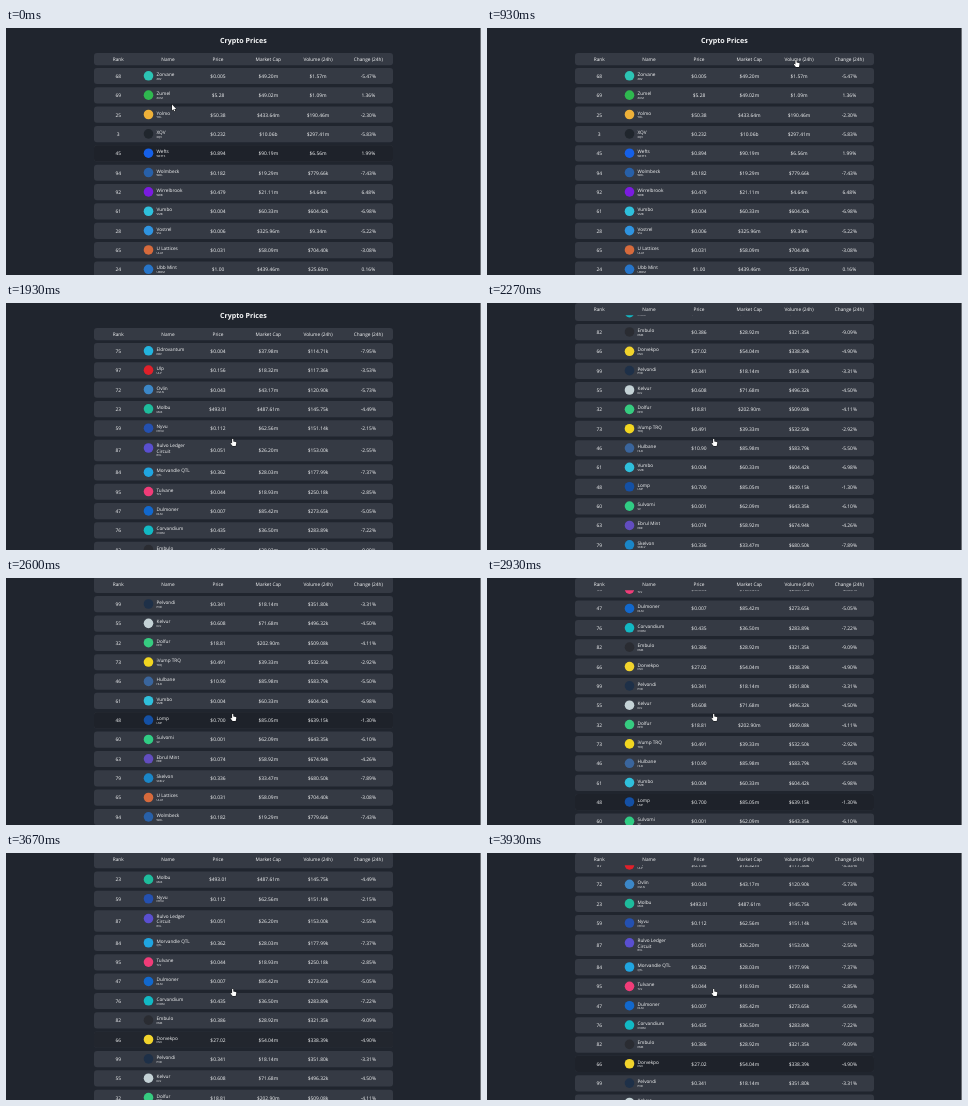
An HTML page with a canvas that plays this animation: 475 by 247 pixels, repeating every 3.99 s.

```html
<!DOCTYPE html>
<html lang="en">
<head>
<meta charset="utf-8">
<title>Crypto Prices</title>
<style>
html, body { margin: 0; width: 100%; height: 100%; overflow: hidden; background: #20252e; }
canvas { display: block; }
</style>
</head>
<body>
<canvas id="stage" width="475" height="247"></canvas>
<script>
const ctx = document.getElementById('stage').getContext('2d');
const LOOP = 3990, STEP = 200 / 3, SORT_AT = 1070;
const PITCH = 19.35, EXTRA = 5.3, TOP = 48;
const ROW = '#353a44', BG = '#20252e', HOVER = '#1e222a', EDGE = '#6c7076';
const FONT = '"Open Sans", "Noto Sans", sans-serif';
const COLUMNS = [112.2, 162, 212, 262.3, 312, 362.3];
const HEADS = ['Rank', 'Name', 'Price', 'Market Cap', 'Volume (24h)', 'Change (24h)'];

// rank | name | ticker | price | cap | volume | change | colour
const coins = `68|Zorvane|ZRV|0.005|49.20m|1.57m|-5.47|#2cc4b4
69|Zumel|ZUM|5.28|49.02m|1.09m|1.36|#2fb84f
25|Yolmo|YOL|50.38|433.64m|190.46m|-2.30|#eeb139
3|XQV|XQV|0.232|10.06b|297.41m|-5.83|#20262d
45|Wefts|WEFTS|0.894|90.19m|6.56m|1.99|#1560e8
94|Wolmbeck|WOL|0.182|19.29m|779.66k|-7.43|#2860a8
92|Wirrelbrook|WRB|0.479|21.11m|4.64m|6.48|#7a1be0
61|Vumbo|VMB|0.004|60.33m|604.42k|-6.98|#2fc0dc
28|Vostrel|VSL|0.006|325.96m|9.34m|-5.22|#2f94e0
65|U Lattices|ULAT|0.031|58.09m|704.40k|-3.08|#d66a3c
24|Ubb Mint|UBBM|1.00|439.46m|25.60m|0.16|#2775c9
75|Eldrovantum|EDV|0.004|37.98m|114.71k|-7.95|#23b4de
97|Ulp|ULP|0.156|18.32m|117.36k|-3.53|#e0202a
72|Ovlin|OVLN|0.043|43.17m|120.90k|-5.73|#3c87c7
23|Molbu|MLB|493.01|487.61m|145.75k|-4.49|#1ebc9c
59|Nyvu|NYVU|0.112|62.56m|151.14k|-2.15|#2450b0
87|Rulvo Ledger/Circuit|RVL|0.051|26.20m|153.00k|-2.55|#5a4fd0
84|Morvandle QTL|QTL|0.362|28.03m|177.99k|-7.37|#20a5e0
95|Tulvane|TLV|0.044|18.93m|250.18k|-2.85|#f03c78
47|Dulmoner|DLM|0.007|85.42m|273.65k|-5.05|#1268cc
76|Corvandium|CVDM|0.435|36.50m|283.89k|-7.22|#12b9c4
82|Embulo|EMB|0.386|28.92m|321.35k|-9.09|#2a2c32
66|Dorvekpo|DVK|27.02|54.04m|338.39k|-4.90|#f2d42c
99|Pelvondi|PVD|0.341|18.14m|351.80k|-3.31|#1e3048
55|Kelvur|KLV|0.608|71.68m|496.32k|-4.50|#c4d2d6
32|Dolfur|DFR|18.81|202.90m|509.08k|-4.11|#36cc80
73|iVump TRQ|TRQ|0.491|39.33m|532.50k|-2.92|#f2d620
46|Hulbane|HLB|10.90|85.98m|583.79k|-5.50|#3a659c
48|Lomp|LMP|0.700|85.05m|639.15k|-1.30|#1450a4
60|Sulvomi|SV|0.001|62.09m|643.35k|-6.10|#30cc84
63|Ebrul Mint|EBR|0.074|58.92m|674.94k|-4.26|#624dbf
79|Skelvon|SKELV|0.336|33.47m|680.50k|-7.89|#1a86c8`.split('\n').map(line => {
  const [rank, name, ticker, price, cap, volume, change, color] = line.split('|');
  return { rank, lines: name.split('/'), ticker, price, cap, volume, change, color };
});

const amount = s => parseFloat(s) * { k: 1e3, m: 1e6, b: 1e9 }[s.slice(-1)];
const byVolume = [...coins].sort((a, b) => amount(a.volume) - amount(b.volume));

// keys: [time, value...], with linear interpolation
function along(keys, t) {
  let i = 0;
  while (i < keys.length - 2 && t > keys[i + 1][0]) i++;
  const [a, b] = [keys[i], keys[i + 1]];
  const p = Math.min(1, Math.max(0, (t - a[0]) / (b[0] - a[0])));
  return a.slice(1).map((v, k) => v + (b[k + 1] - v) * p);
}

const SCROLL = [[1950, 0], [2060, 65], [2266, 217.5], [2420, 255], [2550, 262], [2680, 255],
  [2933, 177.5], [3160, 127], [3400, 98.9], [3700, 77], [3933, 55.2]];
const POINTER = [[0, 166, 76.5], [250, 205, 66], [550, 288, 40], [750, 307, 31.5],
  [1600, 307, 31.5], [1730, 266, 85], [1870, 224.7, 135.5]];
const HOVERS = [
  ['WEFTS', [[200, 1], [450, 0]]],
  ['LMP', [[2500, 0], [2600, 1], [2990, 1], [3150, 0]]],
  ['DVK', [[3500, 0], [3700, 1]]]
];

function box(y, h, color, alpha = 1) {
  ctx.globalAlpha = alpha;
  ctx.fillStyle = color;
  ctx.beginPath();
  ctx.roundRect(88, y, 299, h, 3);
  ctx.fill();
  ctx.globalAlpha = 1;
}

function text(s, x, y, size = 4.9, align = 'center', weight = 500) {
  ctx.font = `${weight} ${size}px ${FONT}`;
  ctx.textAlign = align;
  ctx.fillStyle = '#f8f9fa';
  ctx.fillText(s, x, y);
}

function drawRow(coin, y, t) {
  const tall = coin.lines.length > 1;
  const h = tall ? 16.2 + EXTRA : 16.2;
  box(y - h / 2, h, ROW);
  const hover = HOVERS.find(([ticker]) => ticker === coin.ticker);
  if (hover) box(y - h / 2, h, HOVER, along(hover[1], t)[0]);

  ctx.fillStyle = coin.color;
  ctx.beginPath();
  ctx.arc(142.5, tall ? y - 2.4 : y - 0.2, 4.8, 0, 7);
  ctx.fill();

  const first = tall ? y - 3.2 : y - 0.2;
  coin.lines.forEach((s, i) => text(s, 150.5, first + i * 5.6, 4.7, 'left'));
  text(coin.ticker, 150.5, tall ? y + 6 : y + 3.5, 2.8, 'left');

  const cells = [coin.rank, '', '$' + coin.price, '$' + coin.cap, '$' + coin.volume, coin.change + '%'];
  cells.forEach((s, i) => text(s, COLUMNS[i], y + 1.8));
}

const arrow = new Path2D('M0 0V6L1.4 4.8L2.3 6.8L3.2 6.4L2.3 4.5H4.2Z');
const hand = new Path2D('M1.4 .7Q2 -.1 2.6 .7V3L5 3.5Q5.7 3.7 5.6 4.6L5 7.6H1.9L-.1 5Q0 4.2 .6 4.4L1.4 5Z');

function drawPointer(t) {
  ctx.save();
  ctx.translate(...along(POINTER, t));
  const shape = t < STEP ? arrow : hand;
  ctx.lineWidth = 0.8;
  ctx.strokeStyle = '#111';
  ctx.stroke(shape);
  ctx.fillStyle = '#fff';
  ctx.fill(shape);
  ctx.restore();
}

function draw(t) {
  const scroll = along(SCROLL, t)[0];
  ctx.fillStyle = BG;
  ctx.fillRect(0, 0, 475, 247);
  ctx.fillStyle = EDGE;
  ctx.fillRect(474, 0, 1, 247);
  text('Crypto Prices', 237.3, 15 - scroll, 7.1, 'center', 700);

  let y = TOP - scroll;
  for (const coin of t < SORT_AT ? coins.slice(0, 11) : byVolume) {
    const extra = coin.lines.length > 1 ? EXTRA : 0;
    y += extra / 2;
    if (y > -14 && y < 260) drawRow(coin, y, t);
    y += PITCH + extra / 2;
  }

  // the header sticks to the top edge
  const head = Math.max(0, 25 - scroll);
  box(head, 12.2, ROW);
  HEADS.forEach((s, i) => text(s, COLUMNS[i], head + 7.8, 4.75));
  drawPointer(t);
}

const start = performance.now();
function tick() {
  const t = (performance.now() - start) % LOOP;
  draw(Math.floor((t + 4) / STEP) * STEP);
  requestAnimationFrame(tick);
}
ctx.textRendering = 'geometricPrecision';
tick();
</script>
</body>
</html>
```
